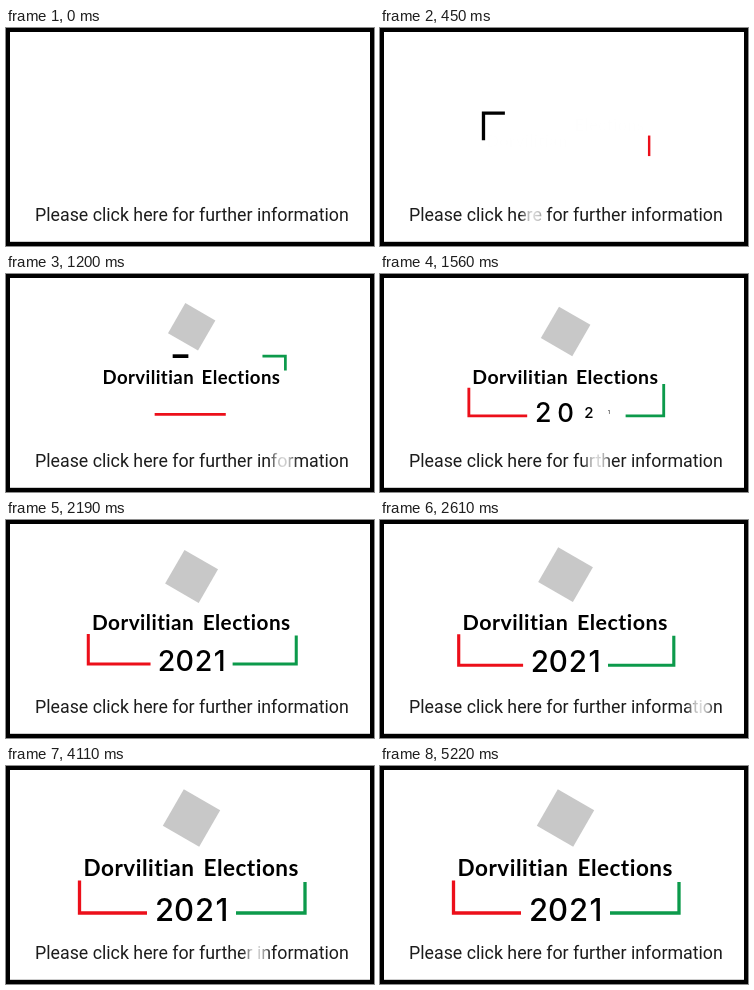
An HTML page with a canvas for the animation above (5.25 s loop, 368 by 218 pixels).

```html
<!DOCTYPE html>
<html lang="en">
<meta charset="utf-8">
<title>Election banner</title>
<style>
  html, body { margin: 0; width: 100%; height: 100%; overflow: hidden; background: #000; }
  canvas { display: block; }
</style>
<canvas id="stage" width="368" height="218"></canvas>
<script>
const LOOP = 5250;
const c = document.getElementById('stage').getContext('2d');
const clamp = v => Math.max(0, Math.min(1, v));

// Linear interpolation through time, value pairs.
function track(t, ...keys) {
  if (t <= keys[0]) return keys[1];
  for (let i = 2; i < keys.length; i += 2) {
    if (t < keys[i]) {
      const u = (t - keys[i - 2]) / (keys[i] - keys[i - 2]);
      return keys[i - 1] + (keys[i + 1] - keys[i - 1]) * u;
    }
  }
  return keys[keys.length - 1];
}

// The strokes travel clockwise along one rectangle, measured from its top left.
const box = { l: 73.5, r: 299, t: 76.5, b: 147 };
const perimeter = 2 * (box.r - box.l + box.b - box.t);
const seam = 120;

function stroke(color, width, from, to) {
  if (to - from < 0.5) return;
  c.beginPath();
  c.moveTo(box.l + seam, box.t);
  c.lineTo(box.r, box.t);
  c.lineTo(box.r, box.b);
  c.lineTo(box.l, box.b);
  c.lineTo(box.l, box.t);
  c.closePath();
  c.strokeStyle = color;
  c.lineWidth = width;
  c.setLineDash([to - from, perimeter - to + from]);
  c.lineDashOffset = seam - from;
  c.stroke();
}

function brackets(t) {
  stroke('#000', 4.5,
    track(t, 150, 555, 810, 555, 1260, 700),
    track(t, 150, 555, 810, 700));
  stroke('#ec0f1a', 3.3,
    track(t, 810, 256, 1500, 454),
    track(t, 200, 256, 810, 324, 1500, 554));
  stroke('#0c9a4b', 3.3,
    track(t, 810, 131, 1560, 259, 1850, 265),
    track(t, 760, 131, 810, 137, 1560, 340, 1850, 365));
}

function title(t) {
  c.font = '700 22.5px Lato, sans-serif';
  c.letterSpacing = '0.5px';
  c.textAlign = 'left';
  c.fillStyle = '#000';
  c.globalAlpha = clamp((t - 450) / 200);
  c.fillText('Dorvilitian', 77.5, 110 + track(t, 450, 12, 1100, 0));
  c.fillText('Elections', 197.5, 110 - track(t, 450, 9, 1100, 0));
  c.globalAlpha = 1;
  c.letterSpacing = '0px';
}

function emblem(t) {
  c.save();
  c.globalAlpha = clamp((t - 1000) / 80);
  c.translate(185.5, 52 + track(t, 1000, 20, 1220, -14, 1500, -3, 2000, 0));
  c.rotate(Math.PI / 6);
  c.fillStyle = '#c8c8c8';
  c.fillRect(-21, -21, 42, 42);
  c.restore();
}

function year(t) {
  const spread = track(t, 1600, 1.32, 2000, 1);
  c.font = '500 31px Inter, sans-serif';
  c.textAlign = 'center';
  c.fillStyle = '#000';
  [158.5, 178, 198.5, 216].forEach((x, i) => {
    const size = clamp((t - 1220 - 100 * i) / 250);
    if (!size) return;
    c.save();
    c.translate(155 + (x - 155) * spread, 143);
    c.scale(size, size);
    c.fillText('2021'[i], 0, 11.5);
    c.restore();
  });
}

// A pale band swings back and forth through the line.
function caption(t) {
  const x = track(t, 0, 375, 100, 350, 700, 15, 810, 72, 1330, 345, 1560, 218,
    1900, 10, 2190, 0, 2650, 350, 3060, 153, 3350, 15, 3900, 350, 4110, 251,
    4550, 10, 4800, -20);
  const ink = c.createLinearGradient(x - 14, 0, x + 14, 0);
  ink.addColorStop(0, '#1c1c1c');
  ink.addColorStop(0.3, '#bbb');
  ink.addColorStop(0.5, '#d8d8d8');
  ink.addColorStop(0.7, '#bbb');
  ink.addColorStop(1, '#1c1c1c');
  c.font = '400 17.8px Roboto, sans-serif';
  c.textAlign = 'left';
  c.fillStyle = ink;
  c.fillText('Please click here for further information', 29, 192.5);
}

function draw(now) {
  const t = now % LOOP;
  c.fillStyle = '#000';
  c.fillRect(0, 0, 368, 218);
  c.fillStyle = '#fff';
  c.fillRect(4, 4, 360, 209.8);

  const zoom = 1 - 0.22 * Math.pow(Math.max(0, 3700 - t) / 2890, 1.6);
  c.save();
  c.translate(186.5, 109);
  c.scale(zoom, zoom);
  c.translate(-186.5, -109);
  brackets(t);
  title(t);
  emblem(t);
  year(t);
  c.restore();
  caption(t);
}

const start = performance.now();
function frame() {
  draw(performance.now() - start);
  requestAnimationFrame(frame);
}
frame();
</script>
</html>
```
